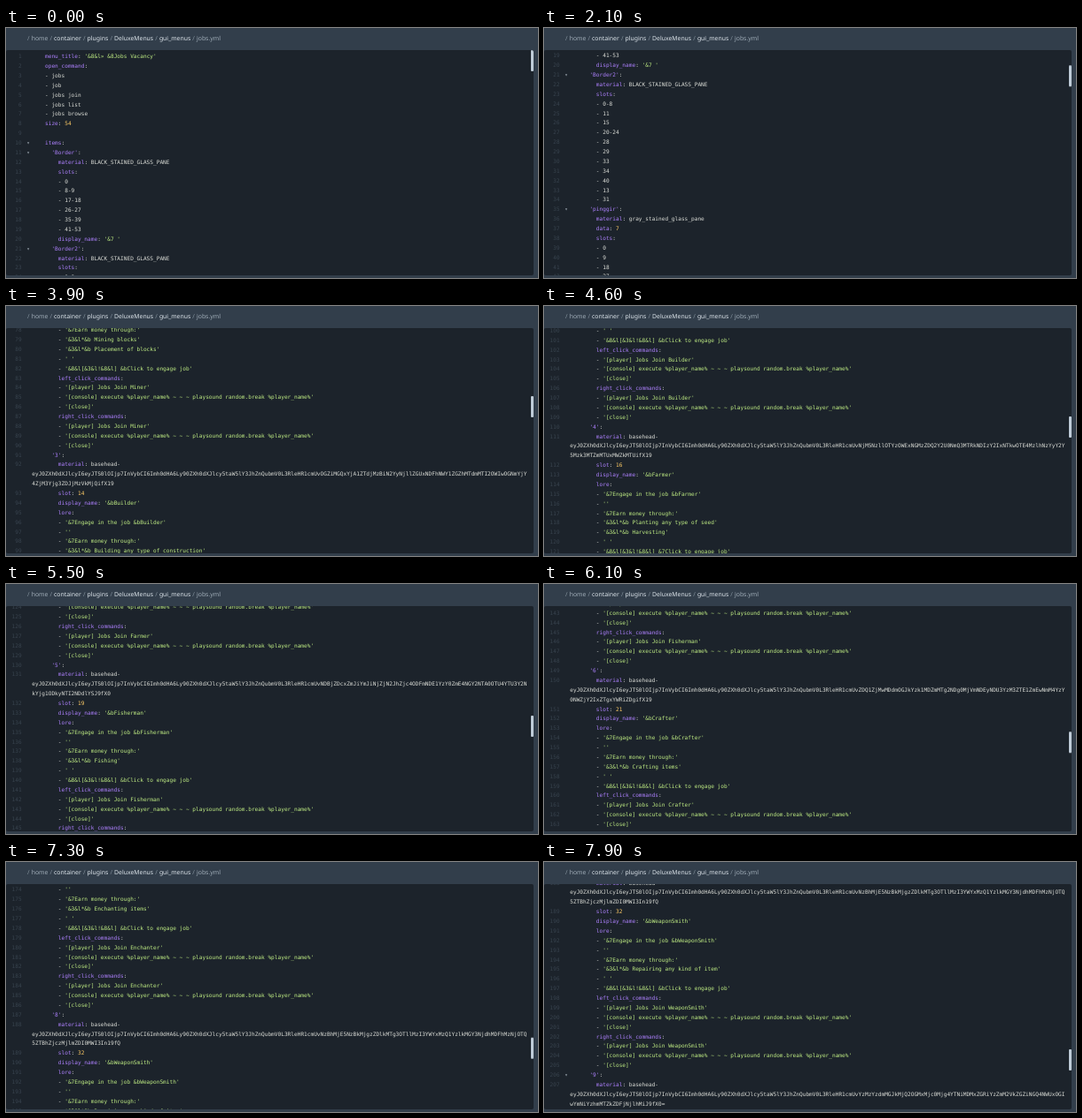
These frames come from a looping animation (600x283 px, 8000 ms). An HTML page:

```html
<!DOCTYPE html>
<html lang="en">
<head>
<meta charset="utf-8">
<title>jobs.yml</title>
<style>
  html, body { margin: 0; width: 100%; height: 100%; overflow: hidden; background: #323e4b; }
  body { position: relative; text-rendering: geometricPrecision; }

  .path {
    position: absolute; left: 24px; top: 7px; white-space: nowrap;
    font: 6.87px/12px "Noto Sans", "DejaVu Sans", sans-serif; color: #84919d;
  }
  .path span { margin: 0 2.1px; color: #dde5eb; }
  .path .dim { color: #a0adb8; }

  .editor {
    position: absolute; left: 0; top: 25px; width: 595px; height: 255px;
    overflow: hidden; border-radius: 2px; background: #1c232b;
  }
  .code {
    position: absolute; left: 0; top: 3.2px; width: 100%; color: #dcded8;
    font: 6.15px/10.875px "DejaVu Sans Mono", monospace;
    animation: scroll 8s -2ms infinite;
  }
  .row { position: relative; height: 10.875px; padding-left: 44px; white-space: pre; }
  .wrap { padding-left: 29.24px; }
  .num { position: absolute; left: 0; width: 17.6px; text-align: right; color: #38434e; }
  .fold { position: absolute; left: 23.2px; color: #8a949d; }
  .key { color: #ae81ff; }
  .str { color: #c0ee84; }
  .val { color: #ffcc66; }

  .thumb {
    position: absolute; right: 0; top: 0; width: 3.4px; height: 23.5px;
    border-radius: 1px; background: #bfccd8;
    animation: thumb 8s -2ms infinite;
  }

  /* The view advances once every 100 ms; margins keep the text on whole pixels. */
  @keyframes scroll {
    0%     { margin-top: 0; animation-timing-function: step-end; }
    16.25% { margin-top: 0; animation-timing-function: steps(4); }
    21.25% { margin-top: -58px; animation-timing-function: steps(4); }
    26.25% { margin-top: -196.6px; animation-timing-function: steps(18); }
    48.75% { margin-top: -885.9px; animation-timing-function: steps(7); }
    57.5%  { margin-top: -1146.2px; animation-timing-function: steps(9); }
    68.75% { margin-top: -1430.5px; animation-timing-function: steps(12); }
    83.75% { margin-top: -1874.4px; animation-timing-function: steps(12); }
    98.75%, 100% { margin-top: -2194.5px; animation-timing-function: step-end; }
  }
  @keyframes thumb {
    0%     { transform: translateY(0); animation-timing-function: step-end; }
    16.25% { transform: translateY(0); animation-timing-function: steps(4); }
    21.25% { transform: translateY(5px); animation-timing-function: steps(4); }
    26.25% { transform: translateY(17.3px); animation-timing-function: steps(18); }
    48.75% { transform: translateY(77px); animation-timing-function: steps(7); }
    57.5%  { transform: translateY(100px); animation-timing-function: steps(9); }
    68.75% { transform: translateY(124px); animation-timing-function: steps(12); }
    83.75% { transform: translateY(160.5px); animation-timing-function: steps(12); }
    98.75%, 100% { transform: translateY(187px); animation-timing-function: step-end; }
  }
</style>
</head>
<body>
<div class="path">/<span class="dim">home</span>/<span>container</span>/<span>plugins</span>/<span>DeluxeMenus</span>/<span>gui_menus</span>/<span class="dim">jobs.yml</span></div>
<div class="editor">
  <div class="code"></div>
  <div class="thumb"></div>
</div>
<script>
  const WRAP = 151;
  const HEAD = 'eyJ0ZXh0dXJlcyI6eyJTS0lOIjp7InVybCI6Imh0dHA6Ly90ZXh0dXJlcy5taW5lY3JhZnQubmV0L3RleHR1cmUv';
  const FOLDS = [10, 11, 21, 35, 206];

  // Job name, slot, ways to earn, texture id, click colour
  const jobs = [
    ['Woodcutter', 10, ['Chopping trees']],
    ['Miner', 12, ['Mining blocks', 'Placement of blocks']],
    ['Builder', 14, ['Building any type of construction'],
      'OGZiMGQxYjA1ZTdjMzBiN2YyNjllZGUxNDFhNWY1ZGZhMTdmMTI2OWIwOGNmYjY4ZjM3Yjg3ZDJjMzVkMjQifX19'],
    ['Farmer', 16, ['Planting any type of seed', 'Harvesting'],
      'NjM5NzllOTYzOWExNGMzZDQ2Y2U0NmQ3MTRkNDIzY2IxNTkwOTE4MzlhNzYyY2Y5Mzk3MTZmMTUxMWZkMTUifX19', '&7'],
    ['Fisherman', 19, ['Fishing'],
      'NDBjZDcxZmJiYmJiNjZjN2JhZjc4ODFmNDE1YzY0ZmE4NGY2NTA0OTU4YTU3Y2NkYjg1ODkyNTI2NDdlYSJ9fX0'],
    ['Crafter', 21, ['Crafting items']],
    ['Enchanter', 23, ['Enchanting items'],
      'MTc2MmExNWIwNDY5MmEyZTRiM2ZiMzY2M2JkNGI3ODQzNGRjZTE3MzJiOGViMWM3YTlmN2MwZmJmNmYifX19'],
    ['WeaponSmith', 32, ['Repairing any kind of item'],
      'NzBhMjE5NzBkMjgzZDlkMTg3OTllMzI3YWYxMzQ1YzlkMGY3NjdhMDFhMzNjOTQ5ZTBhZjczMjlmZDI0MWI3In19fQ'],
    ['Hunter', 34, ['Killing monsters'],
      'YzMzYzdmMGJkMjQ2OGMxMjc0Mjg4YTNiMDMxZGRiYzZmM2VkZGZiNGQ4NWUxOGIwYmNiYzhmMTZkZDFjNjlhMiJ9fX0=']
  ];

  let seed = 7;
  const hex = () => (seed = seed * 16807 % 2147483647) % 16;
  const randomId = () => btoa(Array.from({ length: 62 }, () => hex().toString(16)).join('') + '"}}}');

  const list = text => text.split(' ').map(v => '    - ' + v);
  const click = (side, name) => [
    `    ${side}_click_commands:`,
    `    - '[player] Jobs Join ${name}'`,
    "    - '[console] execute %player_name% ~ ~ ~ playsound random.break %player_name%'",
    "    - '[close]'"
  ];

  const jobLines = ([name, slot, ways, id = randomId(), tint = '&b'], i) => [
    `  '${i + 1}':`,
    '    material: basehead-\n' + HEAD + id,
    '    slot: ' + slot,
    `    display_name: '&b${name}'`,
    '    lore:',
    `    - '&7Engage in the job &b${name}'`,
    "    - ''",
    "    - '&7Earn money through:'",
    ...ways.map(w => `    - '&3&l*&b ${w}'`),
    "    - ' '",
    `    - '&8&l[&3&l!&8&l] ${tint}Click to engage job'`,
    ...click('left', name),
    ...click('right', name)
  ];

  const lines = [
    "menu_title: '&8&l» &8Jobs Vacancy'",
    'open_command:', '- jobs', '- job', '- jobs join', '- jobs list', '- jobs browse',
    'size: 54', '', 'items:',
    "  'Border':", '    material: BLACK_STAINED_GLASS_PANE', '    slots:',
    ...list('0 8-9 17-18 26-27 35-39 41-53'), "    display_name: '&7 '",
    "  'Border2':", '    material: BLACK_STAINED_GLASS_PANE', '    slots:',
    ...list('0-8 11 15 20-24 28 29 33 34 40 13 31'),
    "  'pinggir':", '    material: gray_stained_glass_pane', '    data: 7', '    slots:',
    ...list('0 9 18 27 36 45 8 17 26 35 44 53'), "    display_name: '&7 '",
    ...jobs.flatMap(jobLines)
  ];

  const code = document.querySelector('.code');

  function add(parent, text, name, tag = 'span') {
    const el = document.createElement(tag);
    el.className = name;
    el.textContent = text;
    return parent.appendChild(el);
  }

  function addValue(row, text) {
    const kind = /^ ?'/.test(text) ? 'str' : /^ \d+$/.test(text) ? 'val' : '';
    add(row, text, kind);
  }

  lines.forEach((line, i) => {
    const [first, rest] = line.split('\n');
    const row = add(code, '', 'row', 'div');
    add(row, i + 1, 'num');
    if (FOLDS.includes(i + 1)) add(row, '▾', 'fold');

    const item = first.match(/^( *- )(.*)$/);
    const pair = first.match(/^( *(?:\w+|'\w+'))(:)(.*)$/);
    if (item) {
      add(row, item[1], '');
      addValue(row, item[2]);
    } else if (pair) {
      add(row, pair[1], 'key');
      add(row, pair[2], '');
      addValue(row, pair[3]);
    }
    for (let at = 0; rest && at < rest.length; at += WRAP) {
      add(code, rest.slice(at, at + WRAP), 'row wrap', 'div');
    }
  });
</script>
</body>
</html>
```
